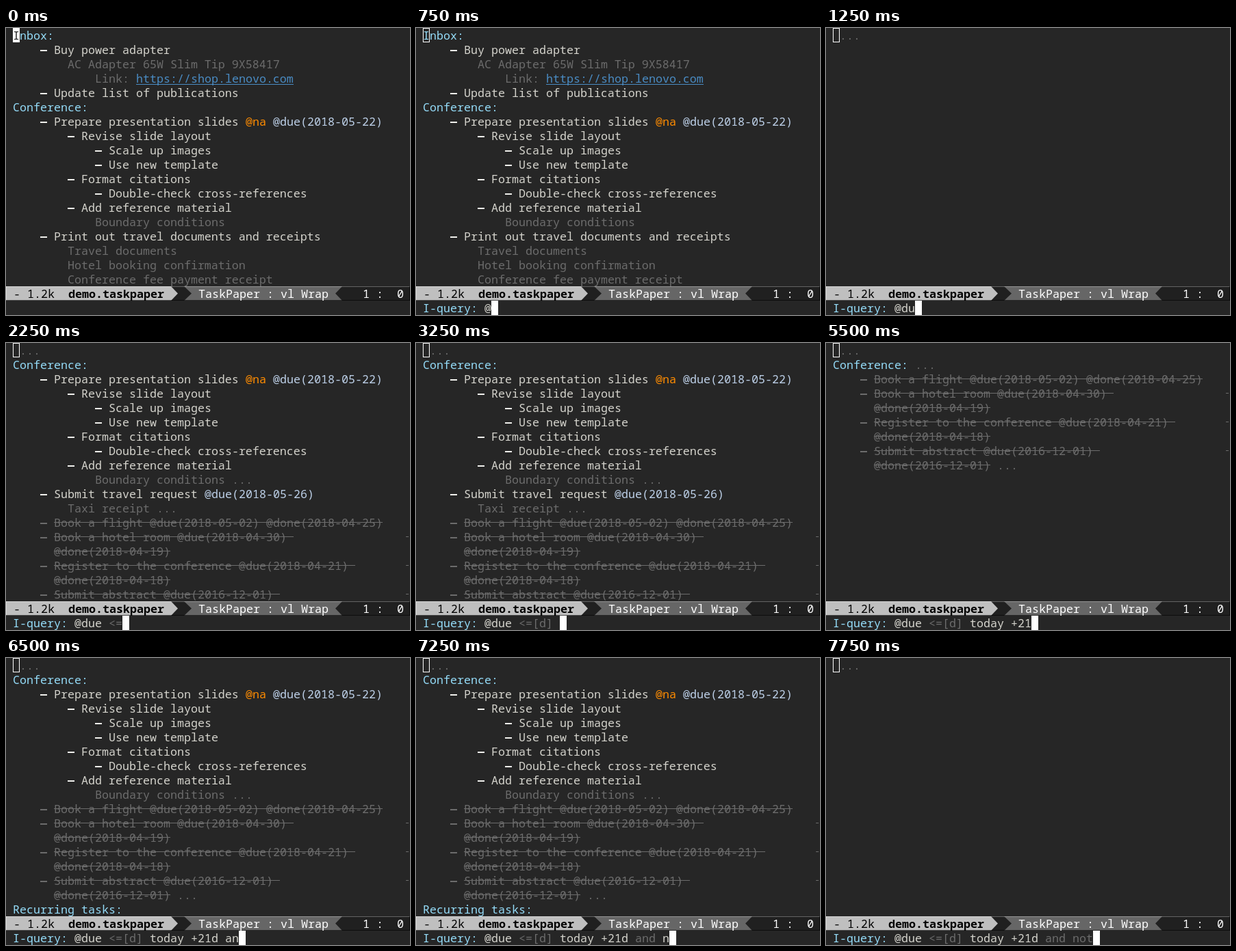
These frames come from a looping animation (590 by 420 pixels, 8 s). An HTML page with a canvas:

```html
<!DOCTYPE html>
<html lang="en">
<head>
<meta charset="utf-8">
<style>
  html, body { margin: 0; height: 100%; overflow: hidden; background: #262626; }
  canvas { display: block; }
</style>
</head>
<body>
<canvas id="stage" width="590" height="420"></canvas>
<script>
const ctx = document.getElementById('stage').getContext('2d');
const STEP = 250, STEPS = 32, CELL = 10, ROW = 21, LEFT = 10;
const BG = '#262626', TEXT = '#d4d3cc', DIM = '#6c6c6c', SKY = '#94dbf8',
      DATE = '#bdd0e8', ORANGE = '#ff8c00', LINK = '#4a8cc4', WHITE = '#ffffff';
const FONT = '16.667px "Noto Sans Mono", "DejaVu Sans Mono", monospace';
const QUERY = '@due <=[d] today +21d and not';

// Leading "~" marks a finished task; a trailing space marks a wrapped line.
const slides = [
  'Conference:',
  '    – Prepare presentation slides @na @due(2018-05-22)',
  '        – Revise slide layout',
  '            – Scale up images',
  '            – Use new template',
  '        – Format citations',
  '            – Double-check cross-references',
  '        – Add reference material',
];
const done = [
  '~    – Book a flight @due(2018-05-02) @done(2018-04-25)',
  '~    – Book a hotel room @due(2018-04-30) ',
  '~      @done(2018-04-19)',
  '~    – Register to the conference @due(2018-04-21) ',
  '~      @done(2018-04-18)',
  '~    – Submit abstract @due(2016-12-01) ',
  '~      @done(2016-12-01) ...',
];
const folded = ' ...', boundary = '            Boundary conditions';
const views = {
  full: [
    'Inbox:',
    '    – Buy power adapter',
    '        AC Adapter 65W Slim Tip 9X58417',
    '            Link: https://shop.lenovo.com',
    '    – Update list of publications',
    ...slides, boundary,
    '    – Print out travel documents and receipts',
    '        Travel documents',
    '        Hotel booking confirmation',
    '        Conference fee payment receipt',
  ],
  none: [folded],
  due: [folded, ...slides, boundary + ' ...',
    '    – Submit travel request @due(2018-05-26)',
    '        Taxi receipt ...', ...done].slice(0, 18),
  past: [folded, 'Conference: ...', ...done],
  soon: [folded, ...slides, boundary + ' ...', ...done, 'Recurring tasks:'],
};
// First step at which each view appears.
const schedule = [[0, 'full'], [4, 'none'], [6, 'due'], [14, 'past'], [23, 'soon'], [30, 'none']];

function rect(x, y, w, h, color) {
  ctx.fillStyle = color;
  ctx.fillRect(x, y, w, h);
}

function text(str, x, top, color, weight = '') {
  ctx.font = weight + ' ' + FONT;
  ctx.fillStyle = color;
  ctx.fillText(str, x, top + 17);
}

function polygon(color, ...points) {
  ctx.fillStyle = color;
  ctx.beginPath();
  points.forEach(([x, y]) => ctx.lineTo(x, y));
  ctx.fill();
}

// Draws the pieces of a string that a pattern splits off, each in its own colour.
function tokens(str, pattern, x, top, colorOf) {
  for (const part of str.split(pattern)) {
    if (!part) continue;
    text(part, x, top, colorOf(part));
    if (part.startsWith('http')) rect(x, top + 19, part.length * CELL, 1, LINK);
    x += part.length * CELL;
  }
}

function drawLine(source, top) {
  const finished = source[0] === '~';
  const line = finished ? source.slice(1) : source;
  const indent = line.search(/\S/);
  const task = line[indent] === '–';
  const start = indent + (task ? 2 : 0);
  const body = line.slice(start), x = LEFT + start * CELL;
  const base = finished ? DIM : task ? TEXT : indent ? DIM : SKY;

  if (task) rect(LEFT + indent * CELL, top + 11, CELL, 2, finished ? DIM : '#f0f0ec');
  tokens(body, /(@na|@due\(.*?\)|https\S+| ?\.\.\.$)/, x, top, part =>
    finished || part.endsWith('...') ? DIM :
    part === '@na' ? ORANGE :
    part.startsWith('@due') ? DATE :
    part.startsWith('http') ? LINK : base);
  if (finished) {
    rect(x, top + 10, body.replace(/ \.\.\.$/, '').length * CELL, 1, DIM);
    if (body.endsWith(' ')) rect(584, top + 10, 4, 1, DIM);
  }
}

function drawModeLine() {
  const top = 378, mid = top + 10.5, end = top + ROW;
  rect(0, top, 590, ROW, '#202020');
  polygon('#bfbfbf', [0, top], [241, top], [251, mid], [241, end], [0, end]);
  polygon('#666666', [260, top], [491, top], [481, mid], [491, end], [260, end], [271, mid]);
  rect(0, top, 590, 1, 'rgba(255,255,255,.3)');
  rect(0, top, 1, ROW, 'rgba(255,255,255,.5)');
  rect(0, end - 1, 590, 1, 'rgba(0,0,0,.6)');
  rect(589, top, 1, ROW, 'rgba(0,0,0,.6)');
  text('- 1.2k', 11, top, '#000000');
  text('demo.taskpaper', 91, top, '#000000', 'bold');
  text('TaskPaper : vl Wrap', 281, top, WHITE);
  text('1 :  0', 521, top, WHITE);
}

function drawPrompt(typed) {
  const top = 399, x = LEFT + 9 * CELL;
  text('I-query:', LEFT, top, SKY);
  tokens(typed, /([<=]+(?:\[d\])?|\band\b|\bnot\b)/, x, top, part =>
    /^([<=]|and$|not$)/.test(part) ? DIM : TEXT);
  rect(x + typed.length * CELL, top, CELL, ROW, WHITE);
}

function draw(step) {
  rect(0, 0, 590, 420, BG);
  const view = schedule.filter(([from]) => from <= step).pop()[1];
  views[view].forEach((line, i) => drawLine(line, i * ROW));
  drawModeLine();
  if (step < 2) {
    rect(LEFT, 0, CELL, ROW, WHITE);
    text('I', LEFT, 0, BG);
  } else {
    ctx.strokeStyle = WHITE;
    ctx.strokeRect(LEFT + .5, .5, CELL - 1, ROW - 1);
    drawPrompt(QUERY.slice(0, step - 2));
  }
}

const origin = performance.now();
function tick() {
  draw(Math.floor((performance.now() - origin) / STEP) % STEPS);
  requestAnimationFrame(tick);
}
tick();
</script>
</body>
</html>
```
